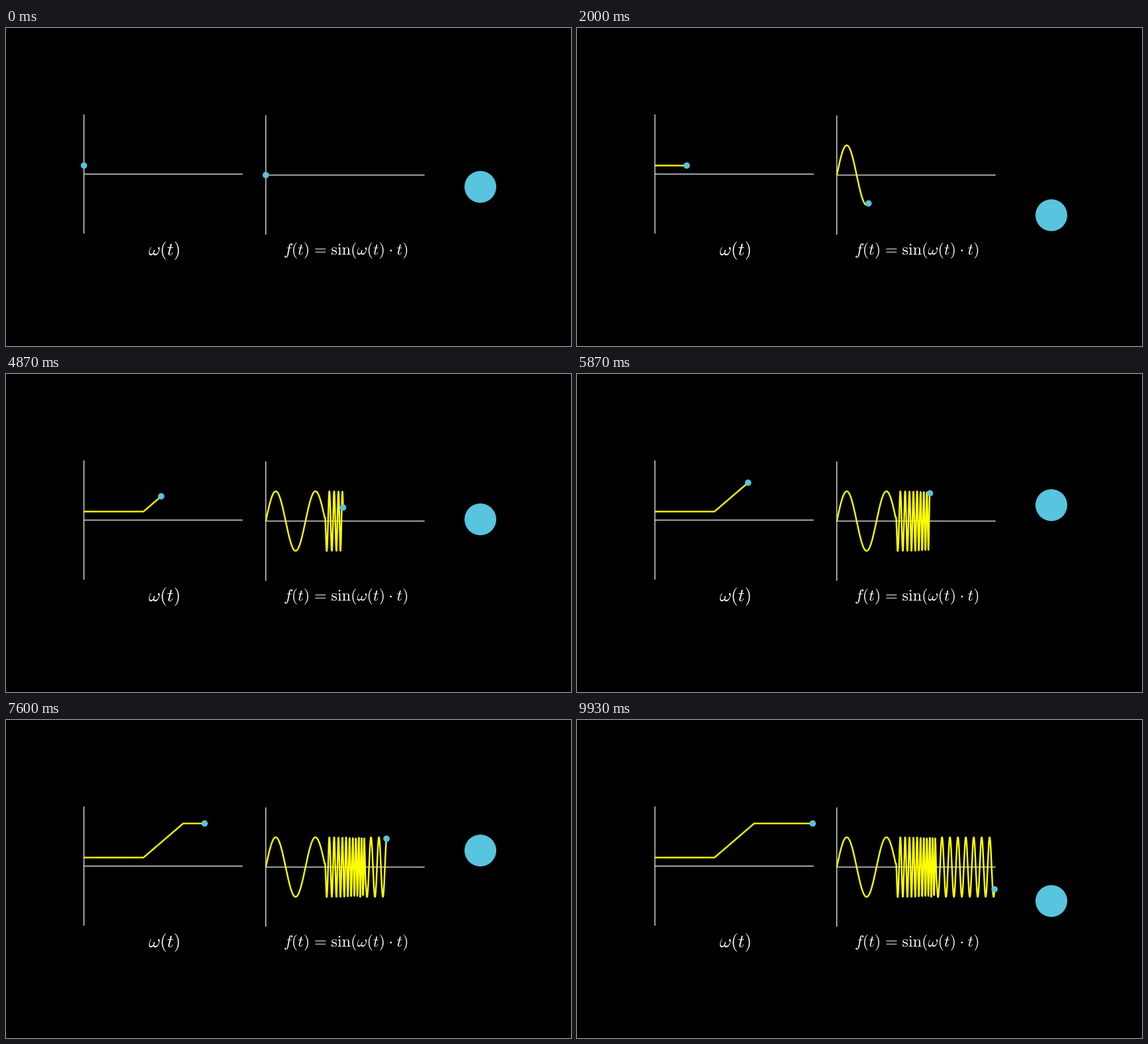
Write a matplotlib script that moves like this. It is 854 px wide and 480 px high and loops after 9.99 s.

```python
import numpy as np
import matplotlib.pyplot as plt
from matplotlib.animation import FuncAnimation
from matplotlib.patches import Circle, PathPatch
from matplotlib.textpath import TextPath
from matplotlib.transforms import Affine2D

W, H, DPI = 854, 480, 64
FRAMES, FPS, DURATION = 150, 15, 10
BLUE, YELLOW = "#58C4DD", "#FFFF00"

PX_PER_SEC = 24
OMEGA_LOW, OMEGA_HIGH = 0.8 * np.pi, 4 * np.pi
RAMP_START, RAMP_END = 3.75, 6.25
OMEGA_SCALE, AMPLITUDE = 5.12, 45
LEFT = (117.8, 220.5)
RIGHT = (392.7, 222.0)
BALL = (717, 239.8)

plt.rcParams["mathtext.fontset"] = "cm"


def omega(t):
    return np.interp(t, [RAMP_START, RAMP_END], [OMEGA_LOW, OMEGA_HIGH])


# The wave is a cubic spline through coarse samples, which rounds its kinks.
STEP = 0.05
COUNT = round(DURATION / STEP)
knots = np.arange(COUNT + 1) * STEP
values = np.sin(omega(knots) * knots)


def spline_slopes(v):
    n = len(v)
    matrix = 4 * np.eye(n) + np.eye(n, k=1) + np.eye(n, k=-1)
    matrix[0, 0] = matrix[-1, -1] = 2
    padded = np.concatenate([v[:1], v, v[-1:]])
    return np.linalg.solve(matrix, 3 * (padded[2:] - padded[:-2]))


slopes = spline_slopes(values)


def wave(t):
    i = np.minimum((np.asarray(t) / STEP).astype(int), COUNT - 1)
    u = t / STEP - i
    return (values[i] * (1 + 2 * u) * (1 - u) ** 2
            + values[i + 1] * u**2 * (3 - 2 * u)
            + slopes[i] * u * (1 - u) ** 2
            - slopes[i + 1] * u**2 * (1 - u))


def omega_point(t):
    return LEFT[0] + PX_PER_SEC * t, LEFT[1] - OMEGA_SCALE * omega(t)


def wave_point(t):
    return RIGHT[0] + PX_PER_SEC * t, RIGHT[1] - AMPLITUDE * wave(t)


fig = plt.figure(figsize=(W / DPI, H / DPI), dpi=DPI, facecolor="black")
ax = fig.add_axes([0, 0, 1, 1])
ax.set_xlim(0, W)
ax.set_ylim(H, 0)
ax.axis("off")


def stroke(xs, ys, color, px, z):
    line, = ax.plot(xs, ys, color=color, lw=px * 72 / DPI, zorder=z, snap=False,
                    solid_capstyle="butt", solid_joinstyle="round")
    return line


def draw_axes(origin):
    x, y = origin
    stroke([x, x], [y - 90, y + 90], "white", 1.2, 1)
    stroke([x, x + PX_PER_SEC * DURATION], [y, y], "white", 1.2, 1)


def disc(center, radius):
    return ax.add_patch(Circle(center, radius, color=BLUE, lw=0, zorder=3))


def formula(text, em, cx, cy):
    path = TextPath((0, 0), text, size=em)
    box = path.get_extents()
    move = (Affine2D()
            .translate(-(box.x0 + box.x1) / 2, -(box.y0 + box.y1) / 2)
            .scale(1, -1).translate(cx, cy))
    ax.add_patch(PathPatch(move.transform_path(path), fc="white", lw=0, zorder=2))


draw_axes(LEFT)
draw_axes(RIGHT)
formula(r"$\omega(t)$", 27.6, 238.7, 336)
formula(r"$f(t)\hspace{0.116}=\hspace{0.116}\mathrm{sin}(\omega(t)"
        r"\hspace{0.053}\cdot\hspace{0.053}t)$", 24.2, 513.7, 335.9)

omega_line = stroke([], [], YELLOW, 2.4, 2)
wave_line = stroke([], [], YELLOW, 2.4, 2)
omega_dot = disc(LEFT, 4.8)
wave_dot = disc(RIGHT, 4.8)
ball = disc(BALL, 24)


def update(frame):
    t = frame / FPS
    ts = np.append(np.arange(0, t, 0.005), t)
    corners = [c for c in (RAMP_START, RAMP_END) if c < t]
    omega_line.set_data(*omega_point(np.array([0, *corners, t])))
    wave_line.set_data(*wave_point(ts))
    omega_dot.center = omega_point(t)
    wave_dot.center = wave_point(t)
    ball.center = BALL[0], BALL[1] - AMPLITUDE * wave(t)
    return omega_line, wave_line, omega_dot, wave_dot, ball


anim = FuncAnimation(fig, update, frames=FRAMES, interval=66.6,
                     init_func=lambda: update(0), repeat=True, repeat_delay=0)
plt.show()
```
